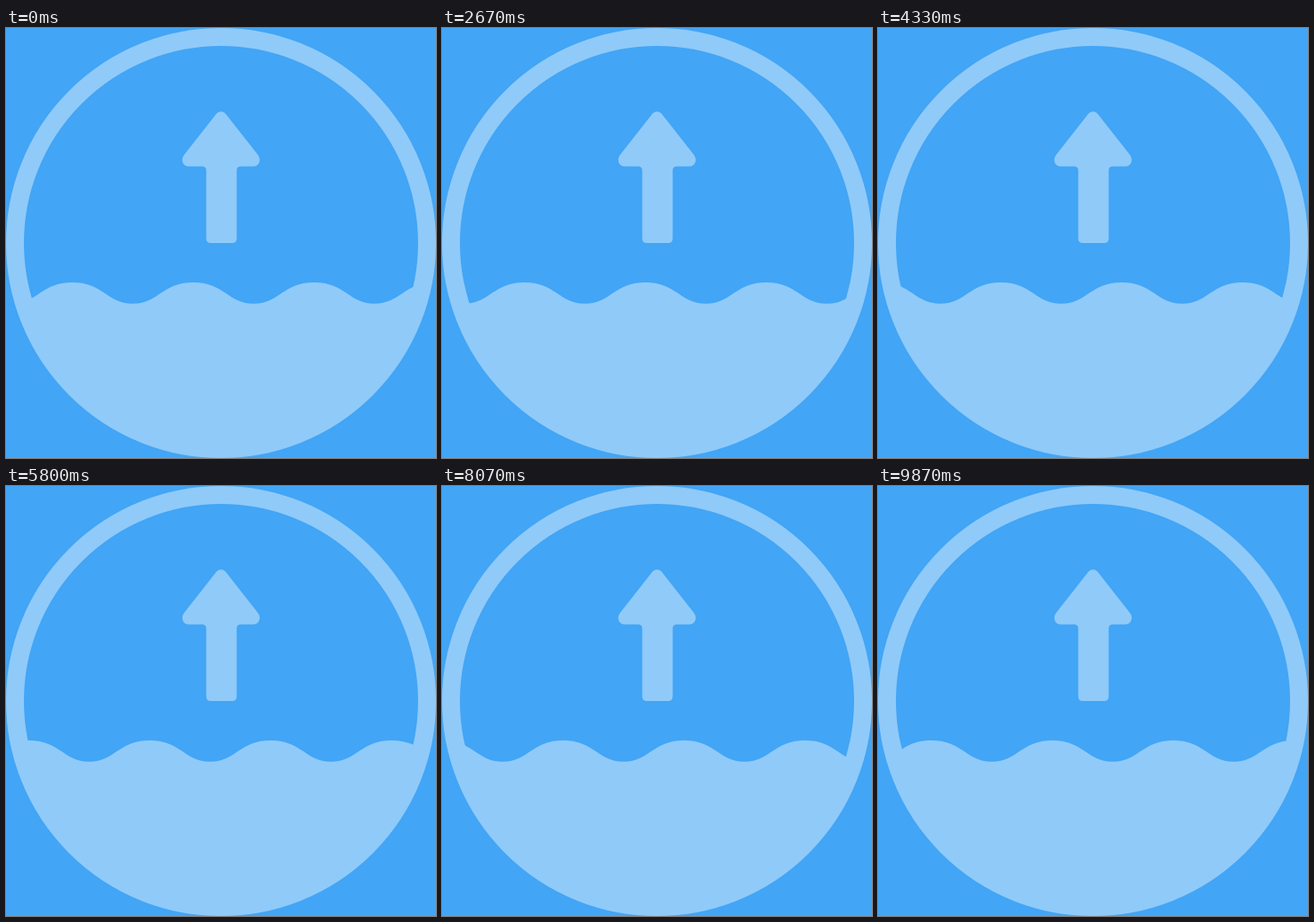
Write an HTML page that moves like this. It is 480 px wide and 480 px high and loops after 9940 ms.

```html
<!DOCTYPE html>
<html>
<head>
<meta charset="utf-8">
<style>
  html, body { margin: 0; height: 100%; overflow: hidden; background: #42a5f5; }
  svg { display: block; width: 100%; height: 100%; }
</style>
</head>
<body>
<svg viewBox="0 0 480 480" fill="#90caf9">
  <clipPath id="bowl"><circle cx="240" cy="240" r="230"/></clipPath>
  <circle cx="240" cy="240" r="230" fill="none" stroke="#90caf9" stroke-width="20"/>
  <path d="M235 95.5Q240 91 245 95.5L281.5 142C285.5 148 282 154.5 276 154.5H262Q257.5 154.5 257.5 159V235Q257.5 240 252.5 240H228.5Q223.5 240 223.5 235V159Q223.5 154.5 219 154.5H204C198 154.5 194.5 148 198.5 142Z"/>
  <g clip-path="url(#bowl)"><path id="water"/></g>
</svg>
<script>
  const LOOP = 9940, FPS = 15, LAST_STEP = 148;
  const WAVELENGTH = 135, SPEED = 108, FIRST_CREST = 74;
  const water = document.getElementById('water');

  // Broad crests, slightly narrower troughs
  let d = 'M-196 284';
  for (let i = 0; i < 6; i++) {
    d += 'c35 0 38.5 23.7 67.5 23.7s32.5 -23.7 67.5 -23.7';
  }
  water.setAttribute('d', d + 'V480H-196Z');

  function draw() {
    const t = performance.now() % LOOP;
    const step = Math.min(LAST_STEP, Math.floor((t + 3.4) * FPS / 1000));
    const shift = (FIRST_CREST + 196 + step / FPS * SPEED) % WAVELENGTH;
    water.setAttribute('transform', `translate(${shift})`);
    requestAnimationFrame(draw);
  }
  draw();
</script>
</body>
</html>
```
